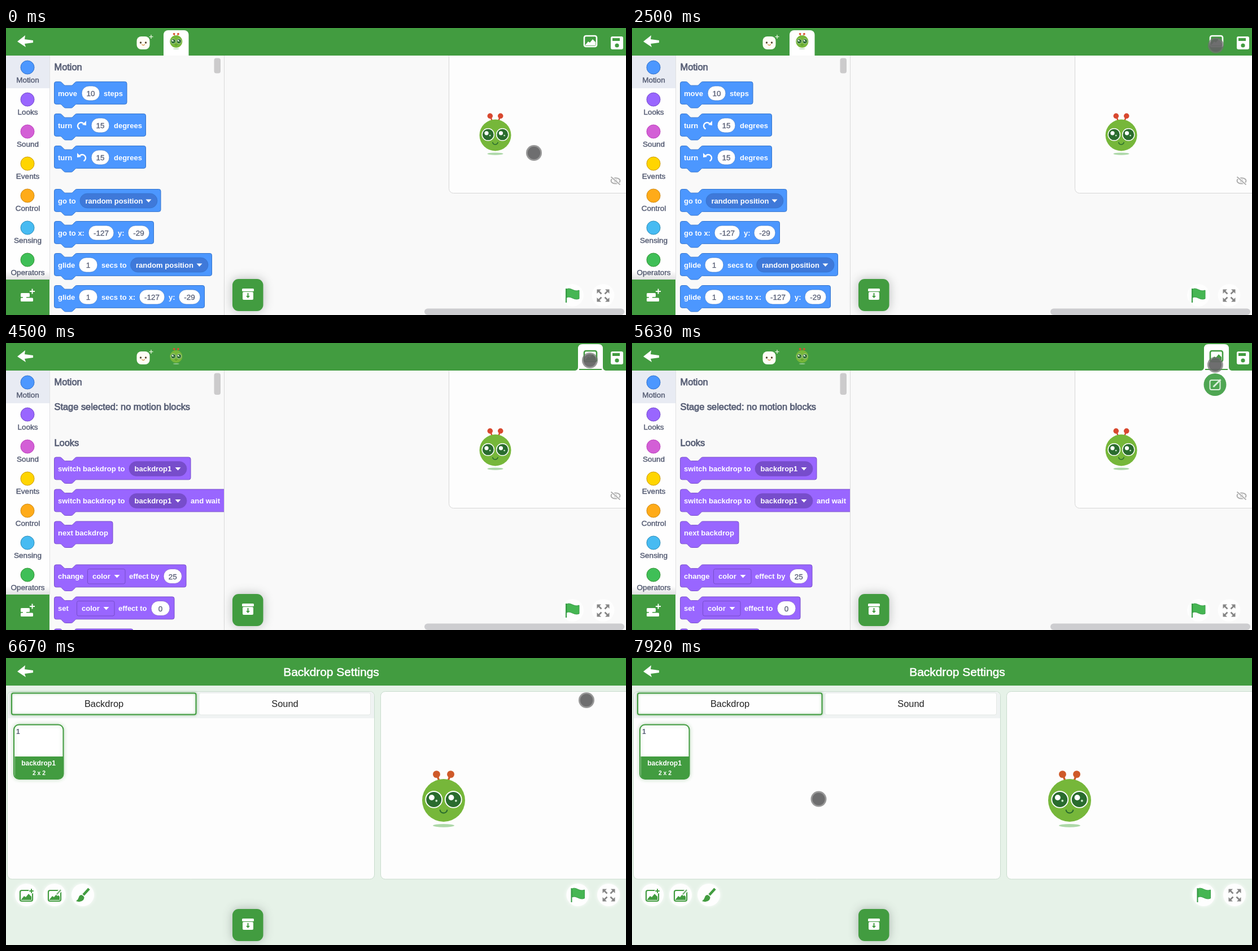
Write an HTML page with a canvas that moves like this. It is 1098x510 px and loops after 8 s.

```html
<!DOCTYPE html>
<html lang="en">
<head>
<meta charset="utf-8">
<title>Block editor</title>
<style>
html, body { margin: 0; width: 100%; height: 100%; overflow: hidden; background: #f9f9f9; }
canvas { display: block; }
</style>
</head>
<body>
<canvas id="stage" width="1098" height="510"></canvas>
<script>
const c = document.getElementById('stage').getContext('2d');
const W = 1098, H = 510, LOOP = 8000;
const TAU = Math.PI * 2;
const GREEN = '#429c40', INK = '#575e75';
const BLUE = ['#4c97ff', '#3373cc', '#3f79d9'], PURPLE = ['#9966ff', '#774dcb', '#774dcb'];
const SANS = '"Liberation Sans", Arial, sans-serif';

// --- helpers ---
function rect(x1, y1, x2, y2, r, fill, stroke, lw = 1) {
  c.beginPath();
  c.roundRect(x1, y1, x2 - x1, y2 - y1, r);
  paint(fill, stroke, lw);
}
function oval(x, y, rx, ry, fill, stroke, lw = 1) {
  c.beginPath();
  c.ellipse(x, y, rx, ry, 0, 0, TAU);
  paint(fill, stroke, lw);
}
function disc(x, y, r, fill, stroke, lw) { oval(x, y, r, r, fill, stroke, lw); }
function poly(pts, fill) {
  c.beginPath();
  for (let i = 0; i < pts.length; i += 2) c.lineTo(pts[i], pts[i + 1]);
  c.closePath();
  paint(fill);
}
function line(pts, color, lw) {
  c.beginPath();
  for (let i = 0; i < pts.length; i += 2) c.lineTo(pts[i], pts[i + 1]);
  paint(null, color, lw);
}
function paint(fill, stroke, lw) {
  if (fill) { c.fillStyle = fill; c.fill(); }
  if (stroke) { c.strokeStyle = stroke; c.lineWidth = lw; c.stroke(); }
}
// Extra stroke gives a medium weight between regular and bold.
function text(s, x, y, size, color, { align = 'left', bold = false, medium = 0 } = {}) {
  c.font = (bold ? 'bold ' : '') + size + 'px ' + SANS;
  c.textAlign = align;
  c.fillStyle = color;
  c.fillText(s, x, y);
  if (medium) { c.strokeStyle = color; c.lineWidth = medium; c.strokeText(s, x, y); }
}
function at(x, y, scale, draw) {
  c.save();
  c.translate(x, y);
  c.scale(scale, scale);
  draw();
  c.restore();
}
function shadowed(color, blur, draw) {
  c.save();
  c.shadowColor = color;
  c.shadowBlur = blur;
  draw();
  c.restore();
}

// --- icons ---
function alien(x, y, r, red) {
  at(x, y, r, () => {
    oval(0, 1.18, .5, .075, '#add8a8');
    for (const s of [-1, 1]) {
      line([s * .2, -.9, s * .32, -1.2], red, .09);
      disc(s * .33, -1.22, .17, red);
    }
    disc(0, 0, 1, '#76b73a');
    for (const s of [-1, 1]) {
      const ex = s * .455;
      disc(ex, -.04, .38, '#2a6c2e', '#fff', .05);
      disc(ex - .1, -.13, .13, '#fff');
      disc(ex + .12, .02, .05, '#c9e8c9');
    }
    c.beginPath();
    c.arc(0, .42, .17, .1, Math.PI - .1);
    paint(null, '#2a6c2e', .055);
  });
}
function picture(x, y, color, lw = 2.6) {
  rect(x - 11, y - 10, x + 11, y + 9, 3, null, color, lw);
  poly([x - 9, y + 6, x - 4, y, x - 1, y + 2, x + 4, y - 4, x + 9, y + 1, x + 9, y + 7, x - 9, y + 7], color);
}
function plus(x, y, r, color, lw) {
  line([x - r, y, x + r, y], color, lw);
  line([x, y - r, x, y + r], color, lw);
}
function backArrow() {
  poly([20, 24, 34, 13, 33, 20, 48, 22, 48, 26, 33, 28, 35, 34], '#fff');
}
function saveIcon() {
  rect(1071, 15, 1093, 38, 3, '#fff');
  rect(1074, 18, 1087, 23, 0, GREEN);
  disc(1082, 31, 3.6, GREEN);
}
function flag(x, y) {
  line([x - 11, y - 12, x - 11, y + 13], '#349a43', 2);
  c.beginPath();
  c.moveTo(x - 10, y - 11);
  c.bezierCurveTo(x - 3, y - 15, x + 3, y - 5, x + 12, y - 9);
  c.lineTo(x + 12, y + 6);
  c.bezierCurveTo(x + 3, y + 10, x - 3, y, x - 10, y + 4);
  c.closePath();
  paint('#46b653', '#389d47', 1);
}
function expand(x, y) {
  for (const sx of [-1, 1]) for (const sy of [-1, 1]) {
    line([x + sx * 3, y + sy * 3, x + sx * 8, y + sy * 8], '#858585', 2.6);
    poly([x + sx * 11, y + sy * 11, x + sx * 3.5, y + sy * 11, x + sx * 11, y + sy * 3.5], '#858585');
  }
}
function hiddenEye(x, y) {
  oval(x, y, 8, 5, null, '#adadad', 2);
  disc(x, y, 2.8, '#adadad');
  line([x - 8, y - 7, x + 8, y + 7], '#fdfdfd', 4);
  line([x - 8, y - 7, x + 8, y + 7], '#adadad', 1.8);
}
function trayButton() {
  shadowed('rgba(60,70,65,.35)', 18, () => rect(401, 446, 455.5, 503, 11, GREEN));
  rect(418, 463, 439, 468, 1.5, '#fff');
  rect(419, 469, 438, 483, 2, '#fff');
  line([428.5, 471, 428.5, 477], GREEN, 2);
  poly([425, 476, 432, 476, 428.5, 480], GREEN);
}
function turnArrow(x, y, dir) {
  c.save();
  c.translate(x, y);
  c.scale(dir, 1);
  c.beginPath();
  c.arc(-1, 1, 6, 2, 5.5);
  paint(null, '#fff', 2.4);
  poly([1, -1, 8, -8, 8, 0], '#fff');
  c.restore();
}

// --- blocks ---
const NOTCH = 'c2 0 3 1 4 2l4 4c1 1 2 2 4 2h12c2 0 3-1 4-2l4-4c1-1 2-2 4-2';
const NOTCH_BACK = 'c-2 0-3 1-4 2l-4 4c-1 1-2 2-4 2h-12c-2 0-3-1-4-2l-4-4c-1-1-2-2-4-2';
function block(y, right, palette, parts) {
  const k = .83, w = (right - 85.5) / k;
  const shape = new Path2D(`M0 4a4 4 0 0 1 4-4h8${NOTCH}H${w - 4}a4 4 0 0 1 4 4V44a4 4 0 0 1-4 4H48${NOTCH_BACK}H4a4 4 0 0 1-4-4z`);
  at(85.5, y, k, () => {
    c.fillStyle = palette[0];
    c.strokeStyle = palette[1];
    c.lineWidth = 1.2;
    c.fill(shape);
    c.stroke(shape);
  });
  const mid = y + 20.5;
  for (const [kind, x, value, end] of parts) PART[kind](x, mid, value, end, palette);
}
function label(x, y, s) { text(s, x, y + 4.5, 13, '#fff', { bold: true }); }
function caret(x, y) { poly([x - 5, y - 2.5, x + 5, y - 2.5, x, y + 3], '#fff'); }
const PART = {
  text: label,
  input(x, y, s, end, p) {
    rect(x, y - 13, end, y + 13, 13, '#fff', p[1], .7);
    text(s, (x + end) / 2, y + 5, 13.5, INK, { align: 'center', medium: .3 });
  },
  pill(x, y, s, end, p) {
    rect(x, y - 13, end, y + 13, 13, p[2], p[1], .7);
    label(x + 9.5, y, s);
    caret(end - 15.5, y);
  },
  menu(x, y, s, end, p) {
    rect(x + .5, y - 13, end, y + 13.5, 3, p[0], p[1], 1);
    label(x + 9, y, s);
    caret(end - 14.5, y);
  },
  turn: turnArrow
};
function heading(s, y) { text(s, 85.5, y + 5.5, 16.4, INK, { medium: .75 }); }

function motionBlocks() {
  const b = (y, right, ...parts) => block(y, right, BLUE, parts);
  heading('Motion', 69);
  b(95.5, 214, ['text', 92, 'move'], ['input', 134, '10', 166], ['text', 173, 'steps']);
  b(152.5, 247.5, ['text', 92, 'turn'], ['turn', 134, 1], ['input', 151, '15', 183], ['text', 191, 'degrees']);
  b(209.5, 247.5, ['text', 92, 'turn'], ['turn', 134, -1], ['input', 151, '15', 183], ['text', 191, 'degrees']);
  b(286.5, 274, ['text', 92, 'go to'], ['pill', 131, 'random position', 268]);
  b(343.5, 261.5, ['text', 92, 'go to x:'], ['input', 146, '-127', 191], ['text', 198, 'y:'], ['input', 216, '-29', 254]);
  b(400.5, 364.5, ['text', 92, 'glide'], ['input', 129, '1', 162], ['text', 169, 'secs to'], ['pill', 220.5, 'random position', 358]);
  b(457.5, 351.5, ['text', 92, 'glide'], ['input', 129, '1', 162], ['text', 169, 'secs to x:'],
    ['input', 236, '-127', 281], ['text', 288, 'y:'], ['input', 306, '-29', 344]);
}
function looksBlocks() {
  const b = (y, right, ...parts) => block(y, right, PURPLE, parts);
  const pick = ['pill', 218, 'backdrop1', 320];
  heading('Motion', 69);
  heading('Stage selected: no motion blocks', 113);
  heading('Looks', 177);
  b(203, 327, ['text', 92, 'switch backdrop to'], pick);
  b(260, 420, ['text', 92, 'switch backdrop to'], pick, ['text', 327, 'and wait']);
  b(317, 189, ['text', 92, 'next backdrop']);
  b(394, 319, ['text', 92, 'change'], ['menu', 144, 'color', 211], ['text', 218, 'effect by'], ['input', 279, '25', 311.5]);
  b(451, 298, ['text', 92, 'set'], ['menu', 125, 'color', 192], ['text', 199, 'effect to'], ['input', 257, '0', 290]);
  b(508, 225);
}

// --- screens ---
function header() {
  c.fillStyle = GREEN;
  c.fillRect(0, 0, W, 49);
  backArrow();
}
const CATEGORIES = [
  ['Motion', '#4c97ff', '#3373cc'], ['Looks', '#9966ff', '#774dcb'], ['Sound', '#d35fd6', '#bd42bd'],
  ['Events', '#ffd500', '#cc9900'], ['Control', '#ffab19', '#cf8b17'], ['Sensing', '#47bbf2', '#2e8eb8'],
  ['Operators', '#3fbf57', '#389438']
];
function sidebar() {
  c.fillStyle = '#fefefe';
  c.fillRect(0, 49, 77, 398);
  c.fillStyle = '#e8ebf3';
  c.fillRect(0, 49, 77, 58);
  CATEGORIES.forEach(([name, fill, edge], i) => {
    const y = 70 + i * 57;
    disc(38, y, 12, fill, edge, 1);
    text(name, 38.5, y + 26.5, 13.5, INK, { align: 'center', medium: .45 });
  });
  const shade = c.createLinearGradient(0, 432, 0, 447);
  shade.addColorStop(0, 'rgba(120,120,125,0)');
  shade.addColorStop(1, 'rgba(120,120,125,.22)');
  c.fillStyle = shade;
  c.fillRect(0, 432, 77, 15);
  c.fillStyle = GREEN;
  c.fillRect(0, 447, 77, 63);
  rect(26, 471, 42, 478, 1.5, '#fff');
  rect(26, 479.5, 48, 486, 1.5, '#fff');
  rect(30, 477, 36, 480.5, 1, '#fff');
  plus(46.5, 468, 4.5, '#fff', 2);
}
function spriteIcons(selected) {
  rect(231.5, 15, 254.5, 38, 8, '#fffdf5');
  disc(238.5, 26, 1.7, '#5a4a30');
  disc(247.5, 26, 1.7, '#5a4a30');
  c.beginPath();
  c.arc(243, 28, 2.6, .3, Math.PI - .3);
  paint(null, '#d08a3c', 1.1);
  plus(257, 15.5, 3.5, '#e5f5dc', 1.3);
  if (selected) rect(279, 4, 323.5, 49, [8, 8, 0, 0], '#fff');
  alien(301.3, 24, 11, '#d9532e');
}
function backdropTab(tint) {
  c.beginPath();
  c.moveTo(1008, 49);
  c.quadraticCurveTo(1013, 48, 1013, 43);
  c.lineTo(1013, 10);
  c.quadraticCurveTo(1013, 2, 1021, 2);
  c.lineTo(1049, 2);
  c.quadraticCurveTo(1057, 2, 1057, 10);
  c.lineTo(1057, 43);
  c.quadraticCurveTo(1057, 48, 1062, 49);
  c.closePath();
  paint('#fff');
  line([1015, 47, 1055, 47], GREEN, 2);
  c.globalAlpha = tint;
  picture(1035, 24, GREEN);
  c.globalAlpha = 1;
}
function editBubble(scale) {
  if (!scale) return;
  at(1032.5, 74, scale, () => {
    disc(0, 0, 20, '#4fa653');
    rect(-9, -8, 9, 9, 3, null, '#dcefdc', 2);
    line([-3, 4, 10, -9], '#dcefdc', 3);
  });
}
function editor(t) {
  const backdrop = t >= 2670;
  c.fillStyle = '#f9f9f9';
  c.fillRect(0, 0, W, H);
  sidebar();

  c.save();
  c.beginPath();
  c.rect(78, 49, 308, 461);
  c.clip();
  (backdrop ? looksBlocks : motionBlocks)();
  c.restore();
  line([77.5, 49, 77.5, 447], '#e0e0e2', 1);
  line([386.5, 49, 386.5, H], '#d9d9d9', 1);
  rect(368.5, 53.5, 380, backdrop ? 92 : 80.5, 4, '#cccbcc');

  rect(784.5, 40, 1110, 293.5, 8, '#fdfdfd', '#d7d7d7');
  alien(866.5, 190.5, 28, '#d8482f');
  hiddenEye(1079.5, 271.5);

  header();
  spriteIcons(!backdrop);
  if (backdrop) backdropTab(ramp(t, 2880, 3090));
  else picture(1035, 24, '#fff');
  saveIcon();
  editBubble(ramp(t, 5000, 5250));

  for (const x of [1003, 1057.5]) disc(x, 475, 20, '#fefefe');
  flag(1003, 475);
  expand(1057.5, 475.5);
  rect(741, 498.5, 1095, 510, 6, '#cdcdd0');
  trayButton();
}
function roundButton(x) {
  shadowed('rgba(255,255,255,.9)', 6, () => disc(x, 421, 20, '#fefefe'));
}
function settings() {
  c.fillStyle = '#e6f2e8';
  c.fillRect(0, 0, W, H);
  header();
  text('Backdrop Settings', 576, 32, 20.9, '#fff', { align: 'center', medium: .6 });

  rect(2.5, 59.5, 652.5, 393, 8, '#fdfdfd', '#c9dccd');
  rect(3, 60, 652, 107, [8, 8, 0, 0], '#f0f3f3');
  shadowed('rgba(66,156,64,.45)', 4, () => rect(10, 62.5, 336.5, 100.5, 3, '#fefefe', GREEN, 2));
  rect(342, 62, 645.5, 101, 3, '#fefefe', '#e3e8e5');
  text('Backdrop', 173.5, 86.5, 16.4, '#222', { align: 'center' });
  text('Sound', 494, 86.5, 16.4, '#222', { align: 'center' });

  shadowed('rgba(66,156,64,.3)', 7, () => rect(14, 118.5, 101.5, 215, 9, '#fff', GREEN, 2));
  rect(15.5, 175, 101.5, 215, [0, 0, 8, 8], GREEN);
  text('1', 18, 135, 12, INK, { bold: true });
  text('backdrop1', 57.5, 191, 12, '#fff', { align: 'center', bold: true });
  text('2 x 2', 58.5, 207.5, 10.4, '#fff', { align: 'center', bold: true });

  rect(663.5, 59.5, 1110, 393, 8, '#fdfdfd', '#c9dccd');
  alien(775, 253, 38, '#cf5a2a');

  for (const x of [36, 86, 136, 1012.5, 1067]) roundButton(x);
  picture(36, 423, GREEN, 2.2);
  disc(45, 414, 5, '#fefefe');
  plus(45, 414, 3.8, GREEN, 2);
  picture(86, 423, GREEN, 2.2);
  line([89, 421, 97, 412], '#fefefe', 6);
  line([90, 420, 97, 412], '#7bb37b', 2.6);
  line([137, 421, 147, 410], GREEN, 4.5);
  c.beginPath();
  c.moveTo(134, 421);
  c.quadraticCurveTo(141, 424, 137, 430);
  c.quadraticCurveTo(132, 435, 124, 432);
  c.quadraticCurveTo(128, 429, 129, 425);
  c.quadraticCurveTo(130, 421, 134, 421);
  paint(GREEN);
  flag(1012.5, 421);
  expand(1067.5, 421.5);
  trayButton();
}

// --- pointer ---
function ramp(t, a, b) {
  const u = Math.min(1, Math.max(0, (t - a) / (b - a)));
  return u * u * (3 - 2 * u);
}
// start, end, target x, target y
const MOVES = [
  [0, 630, 1018, 60], [790, 1090, 1028, 42], [1210, 1540, 1034, 31],
  [5420, 6210, 1028, 75], [7210, 7960, 325, 252]
];
function pointer(t) {
  let x = 935, y = 222;
  for (const [a, b, tx, ty] of MOVES) {
    const u = ramp(t, a, b);
    x += (tx - x) * u;
    y += (ty - y) * u;
  }
  disc(x, y, 14, 'rgba(112,112,112,.72)');
  disc(x, y, 11.2, 'rgba(96,96,98,.75)');
}

function frame(now) {
  const t = now % LOOP;
  if (t < 6670) editor(t);
  else settings();
  pointer(t);
  requestAnimationFrame(frame);
}
requestAnimationFrame(frame);
</script>
</body>
</html>
```
